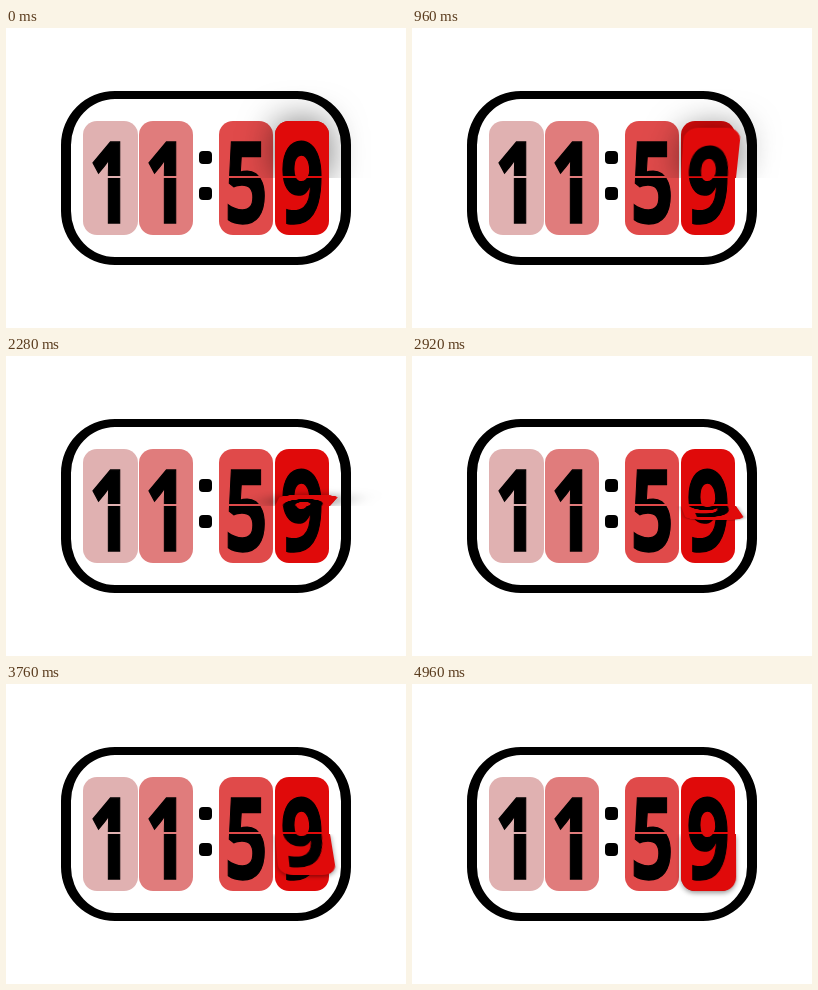
Recreate the animation shown at these times as an HTML page. Size 400 by 300 pixels, loop 5 s.

```html
<!DOCTYPE html>
<html lang="en">
<head>
<meta charset="utf-8">
<title>Flip clock</title>
<style>
  html, body { margin: 0; width: 100%; height: 100%; overflow: hidden; background: #fff; }
  div { position: absolute; box-sizing: border-box; }
  .frame {
    left: 55px; top: 63px; width: 290px; height: 174px;
    border: solid #000; border-width: 8px 10px; border-radius: 54px;
  }
  .dot { left: 193px; width: 13px; height: 13px; border-radius: 4px; background: #000; }

  .half {
    width: 54.5px; height: 57px; overflow: hidden; background: var(--red);
    font: bold 113px/114px "Noto Sans", "Open Sans", sans-serif;
    text-align: center; color: #000;
  }
  /* Condensed, slightly emboldened numerals. */
  .half span {
    position: absolute; left: -50px; right: -50px; top: 1px;
    transform: scaleX(.67); -webkit-text-stroke: 1.5px #000;
  }
  .top { border-radius: 14px 14px 0 0; border-bottom: 2px solid var(--red); }
  .bottom { border-radius: 0 0 14px 14px; }
  .bottom span { top: -56px; }

  /* Each side of the hinge clips the flap to the part in front of the clock. */
  .side { left: 0; width: 400px; height: 150px; overflow: hidden; perspective: 780px; }
  .upper { top: 0; perspective-origin: 200px 180px; }
  .lower { top: 150px; perspective-origin: 200px 30px; }
  .flap { backface-visibility: hidden; }
  .flap.top { transform-origin: bottom; box-shadow: 0 0 35px rgba(0, 0, 0, .55); }
  .flap.bottom { transform-origin: top; box-shadow: 0 2px 5px rgba(0, 0, 0, .4); }
</style>
</head>
<body>
<div class="frame"></div>
<div class="dot" style="top:123px"></div>
<div class="dot" style="top:159px"></div>
<script>
  const HINGE = 150, LOOP = 5000, STEP = 40;
  const cards = [
    [77, "#e0b1b1", 1],
    [132.5, "#e07c7c", 1],
    [212.5, "#e04a4a", 5],
    [268.5, "#e00a0a", 9]
  ];

  function add(parent, className) {
    const el = document.createElement("div");
    el.className = className;
    return parent.appendChild(el);
  }

  function addHalf(parent, part, [x, red, digit], y) {
    const half = add(parent, "half " + part);
    half.style.left = x + "px";
    half.style.top = y + "px";
    half.style.setProperty("--red", red);
    half.innerHTML = `<span>${digit}</span>`;
    return half;
  }

  for (const card of cards) {
    addHalf(document.body, "top", card, HINGE - 57);
    addHalf(document.body, "bottom", card, HINGE);
  }
  const front = addHalf(add(document.body, "side upper"), "top flap", cards[3], HINGE - 57);
  const back = addHalf(add(document.body, "side lower"), "bottom flap", cards[3], 0);

  function draw() {
    const time = Math.floor(performance.now() % LOOP / STEP) * STEP;
    const angle = 180 * time / LOOP;
    front.style.transform = `rotateX(${-angle}deg)`;
    back.style.transform = `rotateX(${180 - angle}deg)`;
    requestAnimationFrame(draw);
  }
  draw();
</script>
</body>
</html>
```
